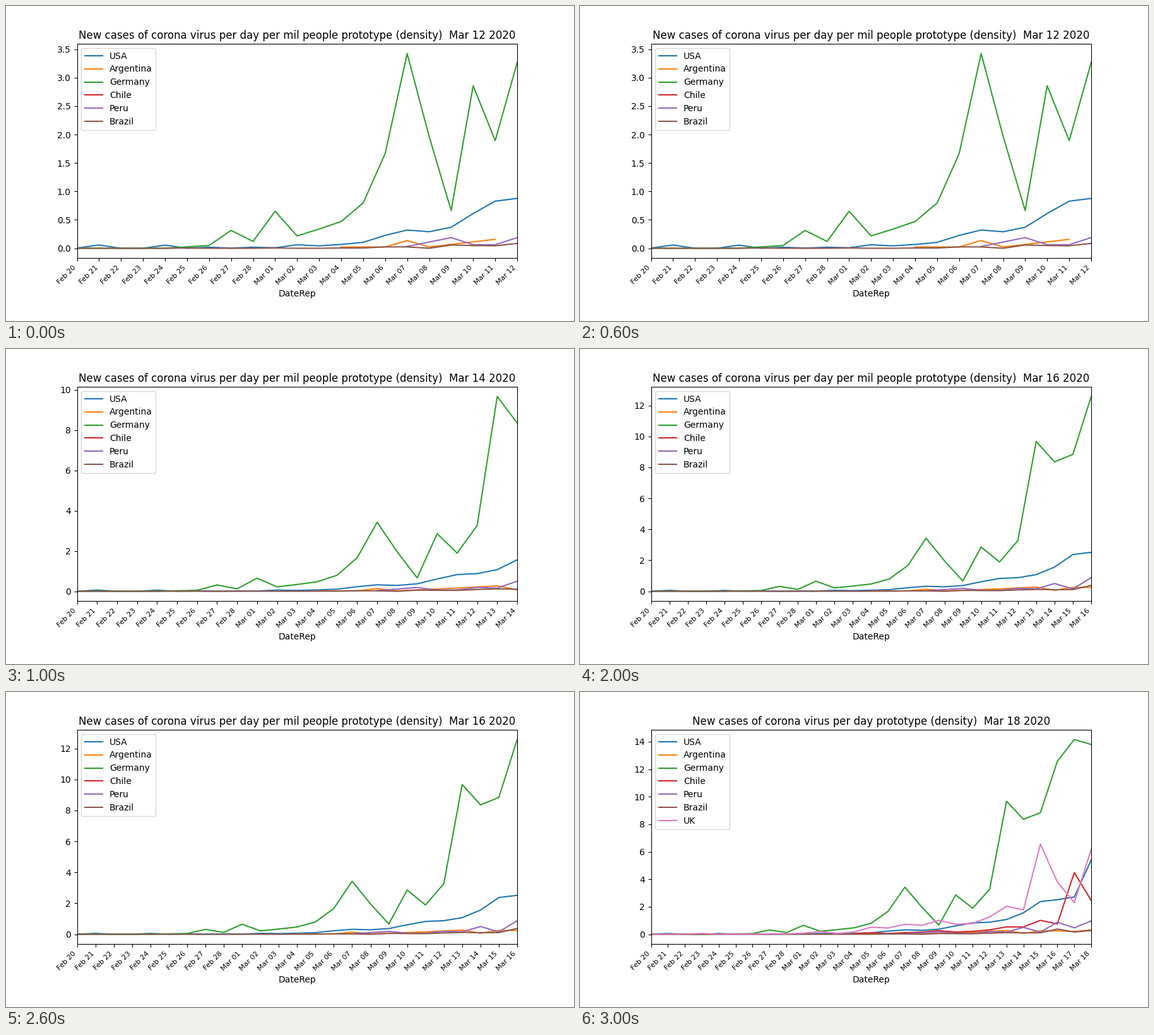
These frames come from a looping animation (900 px wide and 500 px high, 4000 ms). A matplotlib script:

```python
import numpy as np
import matplotlib.pyplot as plt
from matplotlib.animation import FuncAnimation

NAN = np.nan
DAYS = [f"Feb {d}" for d in range(20, 29)] + [f"Mar {d:02d}" for d in range(1, 19)]
LAST_DAYS = [12, 14, 16, 18]

# Population in millions and daily new cases, ending on the last day.
CASES = {
    "USA": (327.167, [1, 19, 0, 0, 18, 0, 6, 1, 6, 3, 20, 14, 22, 34, 74, 105, 95, 121,
                      200, 271, 287, 351, 511, 777, 823, 887, 1766]),
    "Argentina": (44.495, [1, NAN, 1, 6, 1, 3, 5, 7, NAN, 12, 3, 11, 11, 9, 14]),
    "Germany": (82.928, [0, 0, 0, 0, 0, 2, 4, 26, 10, 54, 18, 28, 39, 66, 138, 284, 163,
                         55, 237, 157, 271, 802, 693, 733, 1043, 1174, 1144]),
    "Chile": (18.729, [1, 2, 1, 2, 3, 5, 3, 4, 6, 10, 10, 19, 14, 84, 46]),
    "Peru": (31.989, [1, NAN, 6, 2, 2, 6, 5, 16, 5, 28, 15, 31]),
    "Brazil": (209.469, [0, 0, 0, 0, 0, 1, 0, 0, 0, 1, 0, 0, 1, 1, 5, 5, 0, 12,
                         10, 9, 18, 25, 21, 23, 79, 34, 57]),
    "UK": (66.02, [0, 0, 0, 4, 0, 0, 0, 2, 2, 5, 13, 4, 11, 34, 30, 48, 43, 67,
                   48, 52, 83, 134, 117, 433, 251, 152, 407]),
}

fig = plt.figure(figsize=(9, 5), dpi=100)
fig.subplots_adjust(left=0.125, right=0.9, bottom=0.2, top=0.88)


def density(name, count):
    """Cases per million over the first `count` days, without the gaps."""
    population, cases = CASES[name]
    values = np.full(len(DAYS), NAN)
    values[-len(cases):] = cases
    values = values[:count] / population
    known = np.flatnonzero(np.isfinite(values))
    return known, values[known]


def draw(frame):
    fig.clear()
    ax = fig.add_subplot()
    last_day = LAST_DAYS[frame]
    final = frame == len(LAST_DAYS) - 1
    count = DAYS.index(f"Mar {last_day}") + 1

    for name in CASES:
        if name == "UK" and not final:
            continue
        x, y = density(name, count)
        if name == "Chile" and not final:
            x, y = [], []
        ax.plot(x, y, label=name)

    ax.set_xlim(0, count - 1)
    ax.set_xticks(range(count), DAYS[:count], rotation=45, ha="right", fontsize=8)
    ax.set_xlabel("DateRep")
    unit = "" if final else "per mil people "
    ax.set_title(f"New cases of corona virus per day {unit}prototype (density)  "
                 f"Mar {last_day} 2020")
    ax.legend(loc="upper left")
    return ax.lines


anim = FuncAnimation(fig, draw, frames=len(LAST_DAYS), init_func=lambda: draw(0),
                     interval=1000, repeat=True, repeat_delay=0, blit=False)
plt.show()
```
